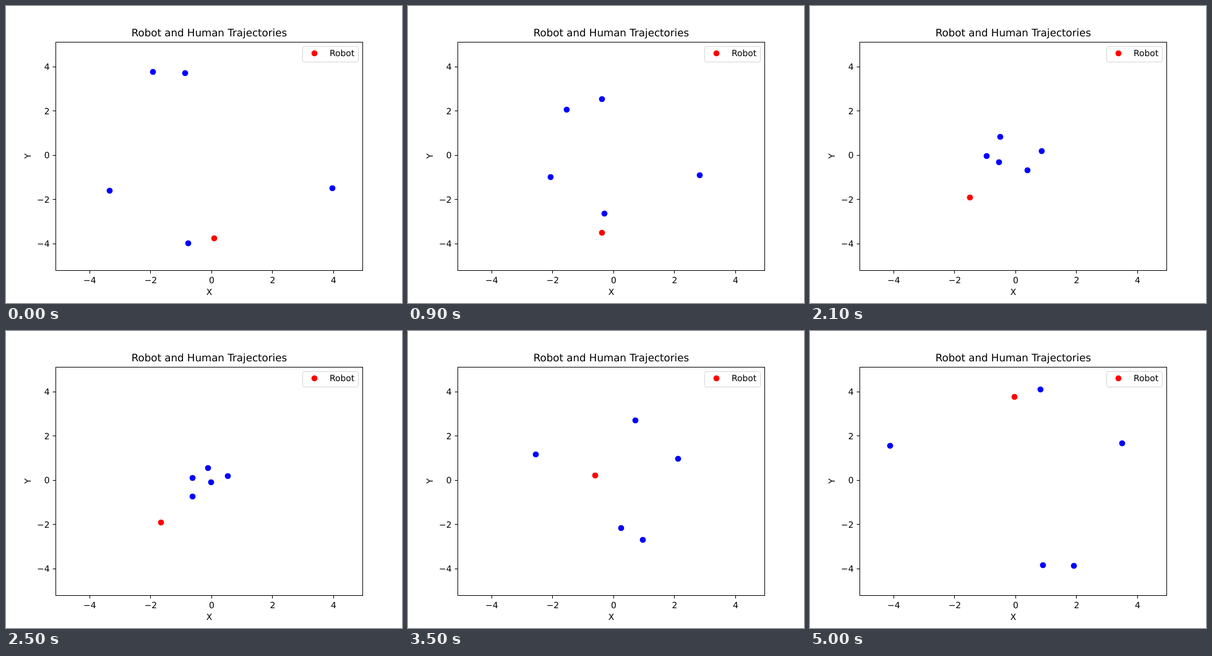
Recreate the animation shown at these times as an HTML page. Size 640 by 480 pixels, loop 5100 ms.

```html
<!DOCTYPE html>
<html lang="en">
<head>
<meta charset="utf-8">
<title>Trajectories</title>
<style>
  html, body { margin: 0; width: 100%; height: 100%; overflow: hidden; background: #fff; }
  svg { display: block; }
  text { font: 13.89px "DejaVu Sans", sans-serif; text-anchor: middle; text-rendering: geometricPrecision; }
  .line { fill: none; stroke: #000; }
</style>
</head>
<body>
<svg id="stage" width="640" height="480" viewBox="0 0 640 480">
  <text x="328.4" y="49" style="font-size:16.67px">Robot and Human Trajectories</text>
  <text x="328.5" y="467">X</text>
  <text transform="translate(40 242.5) rotate(-90)">Y</text>
  <rect x="479.5" y="65.5" width="90" height="25" rx="2.8" fill="#fff" stroke="#d4d4d4"/>
  <text x="523" y="81" style="text-anchor:start">Robot</text>
  <rect class="line" x="80.5" y="58.5" width="496" height="369"/>
</svg>
<script>
const stage = document.getElementById("stage");
const UNIT_X = 49.27, UNIT_Y = 35.75;   // pixels per axis unit
const STEP_MS = 100, STEPS = 51, STRIDE = 0.25;

function add(tag, attrs, text = "") {
  const el = document.createElementNS("http://www.w3.org/2000/svg", tag);
  for (const key in attrs) el.setAttribute(key, attrs[key]);
  el.textContent = text;
  stage.append(el);
  return el;
}

const snap = v => Math.floor(v) + 0.5;

for (let v = -4; v <= 4; v += 2) {
  const label = String(v).replace("-", "\u2212");
  const x = 332.1 + v * UNIT_X, y = 241.2 - v * UNIT_Y;
  add("path", { class: "line", d: `M${snap(x)} 427.5v4.9M80.5 ${snap(y)}h-4.9` });
  add("text", { x: x + 0.3, y: 448 }, label);
  add("text", { x: 70.5, y: Math.round(y + 5), style: "text-anchor:end" }, label);
}

// Cubic Hermite curve through points reached at the given steps
function along(steps, points, t) {
  const last = points.length - 1;
  let i = 0;
  while (i < last - 1 && steps[i + 1] < t) i++;
  const span = steps[i + 1] - steps[i], u = (t - steps[i]) / span;
  const slope = (k, axis) => {
    const p = Math.max(k - 1, 0), q = Math.min(k + 1, last);
    return (points[q][axis] - points[p][axis]) / (steps[q] - steps[p]);
  };
  return [0, 1].map(axis => {
    const a = points[i][axis], b = points[i + 1][axis];
    return a + (b - a) * u * u * (3 - 2 * u) +
      span * u * (1 - u) * (slope(i, axis) * (1 - u) - slope(i + 1, axis) * u);
  });
}

// Humans weave through the crowd until CLEAR, then walk straight to their goal:
// full stride until one unit away, then slowing with the distance.
const CROWD = [0, 9, 16, 25], CLEAR = 25;

function human(goal, points, wait = 0) {
  return step => {
    let [x, y] = along(CROWD, points, Math.min(step, CLEAR));
    for (let s = CLEAR; s < step; s++) {
      const dx = goal[0] - x, dy = goal[1] - y;
      const stride = s === CLEAR ? STRIDE * (1 - wait) : STRIDE;
      const share = stride / Math.max(1, Math.hypot(dx / UNIT_X, dy / UNIT_Y));
      x += dx * share;
      y += dy * share;
    }
    return [x, y];
  };
}

const robot = step => along([0, 3, 9, 18, 25, 35, 42, 50],
  [[336, 375], [329, 391], [313, 366], [272, 309], [250, 309], [302, 233], [325, 176], [330, 106]], step);

const humans = [
  human([426.4, 379.6], [[237, 106], [256, 167], [268, 211], [301, 267.4]]),
  human([376.95, 379.6], [[289, 108], [313, 150], [313, 181], [301, 237]], 0.3),
  human([505.2, 180.6], [[167, 298], [230, 276], [273, 262], [331, 244]], 0.5),
  human([371.9, 92.8], [[294, 383], [317, 335], [340, 301], [358, 233.5]]),
  human([127.8, 184.8], [[527, 294], [471, 273], [429, 251], [325.6, 221]])
];

const marker = fill => add("circle", { r: 4.86, fill, cx: 498.5, cy: 76.5 });
marker("#f00");   // legend
const dots = [...humans, robot].map(at => ({ at, el: marker(at === robot ? "#f00" : "#00f") }));

function draw() {
  const step = Math.floor(performance.now() / STEP_MS) % STEPS;
  for (const { at, el } of dots) {
    const [x, y] = at(step);
    el.setAttribute("cx", Math.round(x) + 0.5);
    el.setAttribute("cy", Math.round(y) + 0.5);
  }
  requestAnimationFrame(draw);
}
draw();
</script>
</body>
</html>
```
